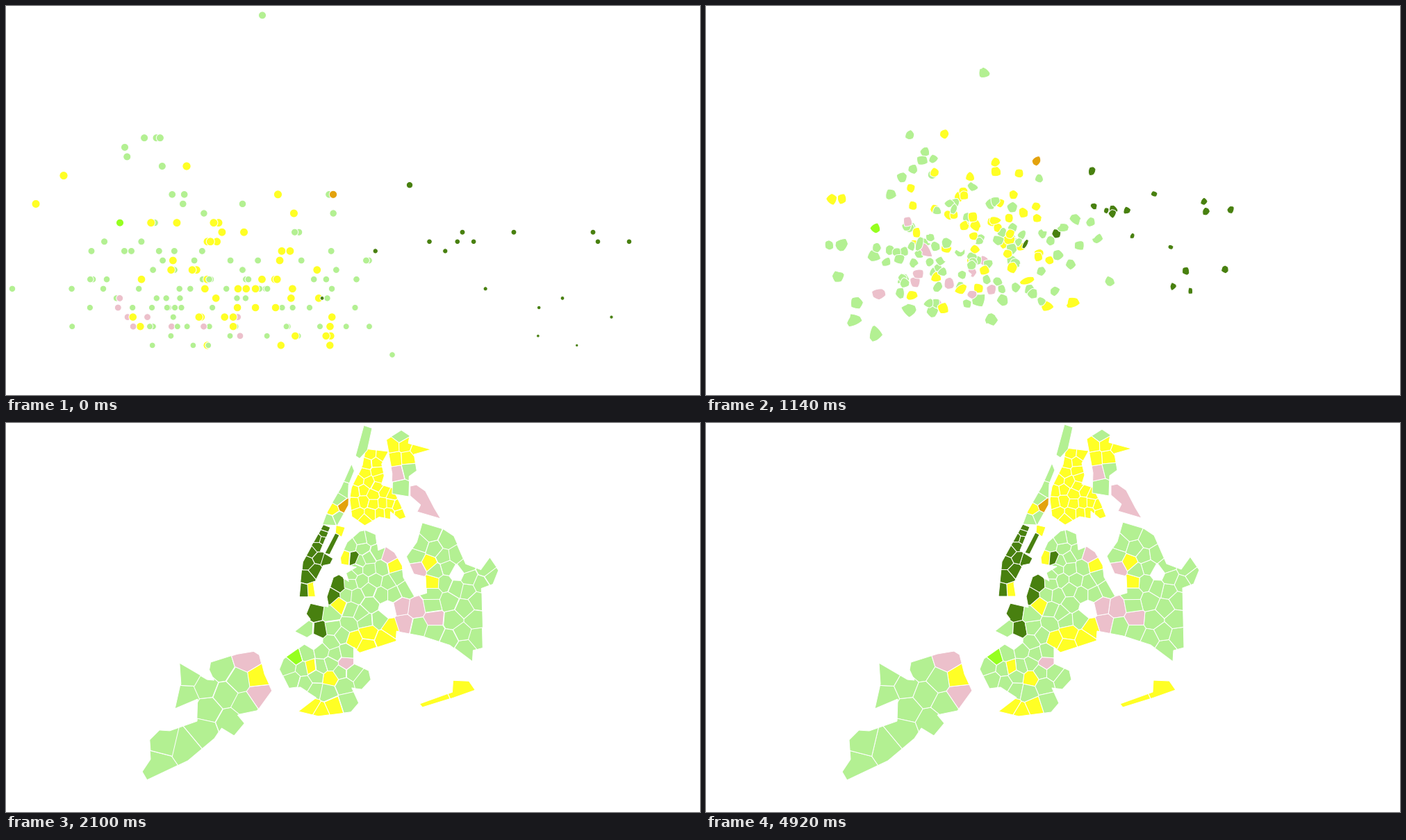
These frames come from a looping animation (999x561 px, 4.95 s). A matplotlib script:

```python
import numpy as np
import matplotlib.pyplot as plt
from matplotlib.animation import FuncAnimation
from matplotlib.collections import PolyCollection
from matplotlib.path import Path

W, H, DPI = 999, 561, 100
STEP, FRAMES = 30, 165
START, LENGTH = 282, 2000
N = 144  # points per shape
rng = np.random.default_rng(8)

GREEN, YELLOW, PINK = "#b3f092", "#ffff25", "#ecc0cb"
DARK, ORANGE, LIME, EMPTY = "#48800f", "#e3a20c", "#96ff1f", None

# Base colour, number of districts, coast
LANDS = [
    (GREEN, 16, [(249, 346), (290, 370), (300, 371), (293, 356), (295, 345), (333, 333),
                 (357, 329), (365, 334), (372, 362), (383, 386), (362, 415), (333, 421),
                 (343, 433), (328, 451), (310, 440), (300, 455), (262, 487), (203, 515),
                 (196, 503), (208, 485), (206, 457), (220, 443), (235, 444), (275, 430),
                 (276, 398), (243, 412), (251, 376)]),
    (GREEN, 112, [(510, 156), (519, 154), (533, 160), (536, 183), (548, 178), (560, 186),
                  (571, 205), (573, 222), (589, 250), (606, 245), (605, 221), (588, 217),
                  (577, 192), (592, 171), (600, 143), (630, 152), (645, 162), (663, 203),
                  (684, 211), (697, 193), (710, 212), (702, 232), (686, 238), (688, 324),
                  (673, 328), (672, 344), (640, 320), (600, 307), (563, 300), (562, 314),
                  (510, 331), (501, 323), (501, 347), (523, 357), (526, 370), (513, 384),
                  (498, 382), (508, 404), (497, 417), (450, 423), (421, 416), (447, 396),
                  (424, 381), (408, 383), (394, 355), (400, 340), (440, 312), (416, 300),
                  (438, 283), (432, 275), (438, 260), (464, 266), (461, 250), (470, 222),
                  (478, 218), (494, 228), (490, 216), (505, 207), (483, 203), (482, 194),
                  (492, 172)]),
    (YELLOW, 27, [(518, 36), (551, 40), (541, 58), (545, 75), (541, 88), (557, 93),
                  (569, 117), (576, 135), (567, 138), (554, 127), (554, 138), (538, 135),
                  (517, 147), (498, 134), (495, 110), (498, 92), (514, 60)]),
    (YELLOW, 9, [(548, 23), (570, 9), (582, 17), (580, 28), (613, 37), (588, 44),
                 (592, 68), (581, 76), (580, 105), (556, 101), (557, 72), (553, 50)]),
    (PINK, 1, [(583, 90), (592, 88), (605, 97), (618, 122), (627, 137), (593, 127),
               (598, 117), (583, 104)]),
    (YELLOW, 2, [(596, 405), (643, 388), (644, 371), (667, 372), (676, 385), (645, 396),
                 (600, 410)]),
    (GREEN, 1, [(516, 2), (528, 6), (521, 38), (510, 50), (504, 46)]),
    (GREEN, 7, [(498, 58), (502, 68), (494, 88), (493, 118), (477, 147), (456, 146),
                (463, 127), (483, 92)]),
    (YELLOW, 1, [(476, 147), (489, 150), (484, 164), (475, 158)]),
    (DARK, 1, [(474, 158), (480, 161), (466, 189), (459, 187)]),
    (DARK, 13, [(456, 146), (466, 150), (452, 184), (470, 195), (466, 203), (456, 205),
                (443, 231), (446, 250), (421, 250), (426, 200), (437, 180)]),
]

# Areas (x, y, radius) that differ from their land's base colour
ZONES = {
    YELLOW: [(354, 335, 5), (361, 354, 5), (517, 308, 17), (547, 303, 17), (442, 347, 12),
             (458, 364, 5), (440, 414, 14), (461, 407, 9), (474, 261, 5), (563, 212, 6),
             (610, 199, 6), (616, 233, 6), (490, 190, 7), (469, 127, 9), (440, 250, 4)],
    PINK: [(338, 352, 6), (355, 395, 6), (578, 276, 18), (627, 282, 17), (550, 186, 6),
           (597, 211, 5), (490, 341, 5), (571, 80, 4)],
    DARK: [(505, 187, 6), (475, 238, 14), (442, 270, 9), (454, 305, 13)],
    GREEN: [(568, 18, 6), (577, 63, 4), (560, 90, 6)],
    ORANGE: [(487, 116, 3)],
    LIME: [(424, 334, 3)],
    EMPTY: [(647, 222, 4), (442, 324, 4), (545, 272, 12)],
}

# Dots per colour: mean and spread of x, range of x, mean row, base radius, growth per row
SPREAD = {
    GREEN: (310, 115, (85, 536), 9, 4.3, 0.06),
    YELLOW: (310, 95, (144, 495), 8, 5.7, 0.02),
    PINK: (200, 95, (115, 346), 5, 4.8, 0.02),
    DARK: (650, 140, (437, 878), 7, 2, 0.15),
    ORANGE: (471, 0, (471, 471), 17, 5.6, 0),
    LIME: (164, 0, (164, 164), 14, 5.5, 0),
}

# Outlying dots: colour, x, row, and the place they travel to
OUTLIERS = [
    (GREEN, 369, 36, 478, 278), (GREEN, 9, 7, 555, 203), (GREEN, 556, 0, 643, 170),
    (GREEN, 171, 22, 603, 260), (YELLOW, 43, 16, 474, 261), (YELLOW, 83, 19, 441, 345),
    (YELLOW, 260, 20, 523, 84), (ORANGE, 471, 17, 487, 118), (LIME, 164, 14, 425, 334),
    (DARK, 581, 18, 505, 187), (DARK, 657, 13, 429, 228), (DARK, 845, 13, 441, 187),
    (DARK, 852, 12, 433, 201), (DARK, 897, 12, 449, 193),
]


def spread_seeds(coast, count):
    """Random centres inside the coast, relaxed to even spacing."""
    lo, hi = coast.min(axis=0), coast.max(axis=0)
    pts = rng.uniform(lo, hi, (9000, 2))
    pts = pts[Path(coast).contains_points(pts)]
    seeds = pts[:count].copy()
    for _ in range(12):
        near = np.argmin(((pts[:, None] - seeds) ** 2).sum(axis=2), axis=1)
        for k in range(count):
            if np.any(near == k):
                seeds[k] = pts[near == k].mean(axis=0)
    return seeds


def nearer(poly, a, b):
    """Part of poly that lies closer to a than to b."""
    side = (poly - (a + b) / 2) @ (b - a)
    out = []
    for i in range(len(poly)):
        p, q, u, v = poly[i - 1], poly[i], side[i - 1], side[i]
        if (u < 0) != (v < 0):
            out.append(p + (q - p) * u / (u - v))
        if v <= 0:
            out.append(q)
    return np.array(out).reshape(-1, 2)


def area(poly):
    x, y = poly.T
    return np.sum(x * np.roll(y, -1) - y * np.roll(x, -1)) / 2


def resample(poly):
    """N points evenly spaced round poly, always in the same direction."""
    if area(poly) < 0:
        poly = poly[::-1]
    ring = np.vstack([poly, poly[:1]])
    dist = np.r_[0, np.cumsum(np.hypot(*np.diff(ring, axis=0).T))]
    at = np.linspace(0, dist[-1], N, endpoint=False)
    return np.column_stack([np.interp(at, dist, ring[:, k]) for k in (0, 1)])


def build_map():
    shapes, colors, seeds = [], [], []
    for base, count, coast in LANDS:
        coast = np.array(coast, float)
        centres = spread_seeds(coast, count)
        for i, a in enumerate(centres):
            poly = coast
            for j, b in enumerate(centres):
                if j != i and len(poly):
                    poly = nearer(poly, a, b)
            if len(poly) > 2:
                shapes.append(resample(poly))
                colors.append(base)
                seeds.append(a)
    seeds = np.array(seeds)
    for color, spots in ZONES.items():
        for x, y, r in spots:
            gap = np.hypot(*(seeds - (x, y)).T)
            for i in np.flatnonzero(gap <= max(r, gap.min())):
                colors[i] = color
    keep = [i for i, c in enumerate(colors) if c is not EMPTY]
    return np.array(shapes)[keep], [colors[i] for i in keep], seeds[keep]


def place_dots(shapes, colors, seeds):
    """Start position (x, row) of every district."""
    spots = np.zeros((len(colors), 2))
    for i, color in enumerate(colors):
        mean, dev, limits, row, *_ = SPREAD[color]
        x = rng.normal(mean, dev)
        if not limits[0] <= x <= limits[1]:
            x = rng.uniform(*limits)
        # sparse, wide districts start low
        row = rng.gamma(2.6, row / 2.6) * min(1, 500 / area(shapes[i]))
        spots[i] = x, min(round(row), 23)
    for color, x, row, tx, ty in OUTLIERS:
        same = [i for i, c in enumerate(colors) if c == color]
        spots[min(same, key=lambda i: np.hypot(*(seeds[i] - (tx, ty))))] = x, row
    return spots


def circle(spot, color, shape):
    """Circle whose first point faces the same way as the shape's."""
    x, row = spot
    base, growth = SPREAD[color][4:]
    r = base + growth * min(row, 20)
    dx, dy = shape[0] - shape.mean(axis=0)
    a = np.arctan2(dy, dx) + np.linspace(0, 2 * np.pi, N, endpoint=False)
    return np.column_stack([x + r * np.cos(a), 503 - 13.6 * row + r * np.sin(a)])


shapes, colors, seeds = build_map()
spots = place_dots(shapes, colors, seeds)
dots = np.array([circle(*args) for args in zip(spots, colors, shapes)])

fig = plt.figure(figsize=(W / DPI, H / DPI), dpi=DPI, facecolor="white")
ax = fig.add_axes([0, 0, 1, 1])
ax.set(xlim=(0, W), ylim=(H, 0))
ax.axis("off")
art = PolyCollection(dots, facecolors=colors, edgecolors="white", linewidths=72 / DPI,
                     joinstyle="round")
ax.add_collection(art, autolim=False)


def ease(t):
    t = min(max(t, 0), 1)
    return 4 * t ** 3 if t < 0.5 else 1 - 4 * (1 - t) ** 3


def draw(i):
    p = ease((i * STEP - START) / LENGTH)
    art.set_verts(dots + (shapes - dots) * p)
    return [art]


anim = FuncAnimation(fig, draw, frames=FRAMES, interval=STEP, repeat=True,
                     repeat_delay=0, blit=False)
plt.show()
```
